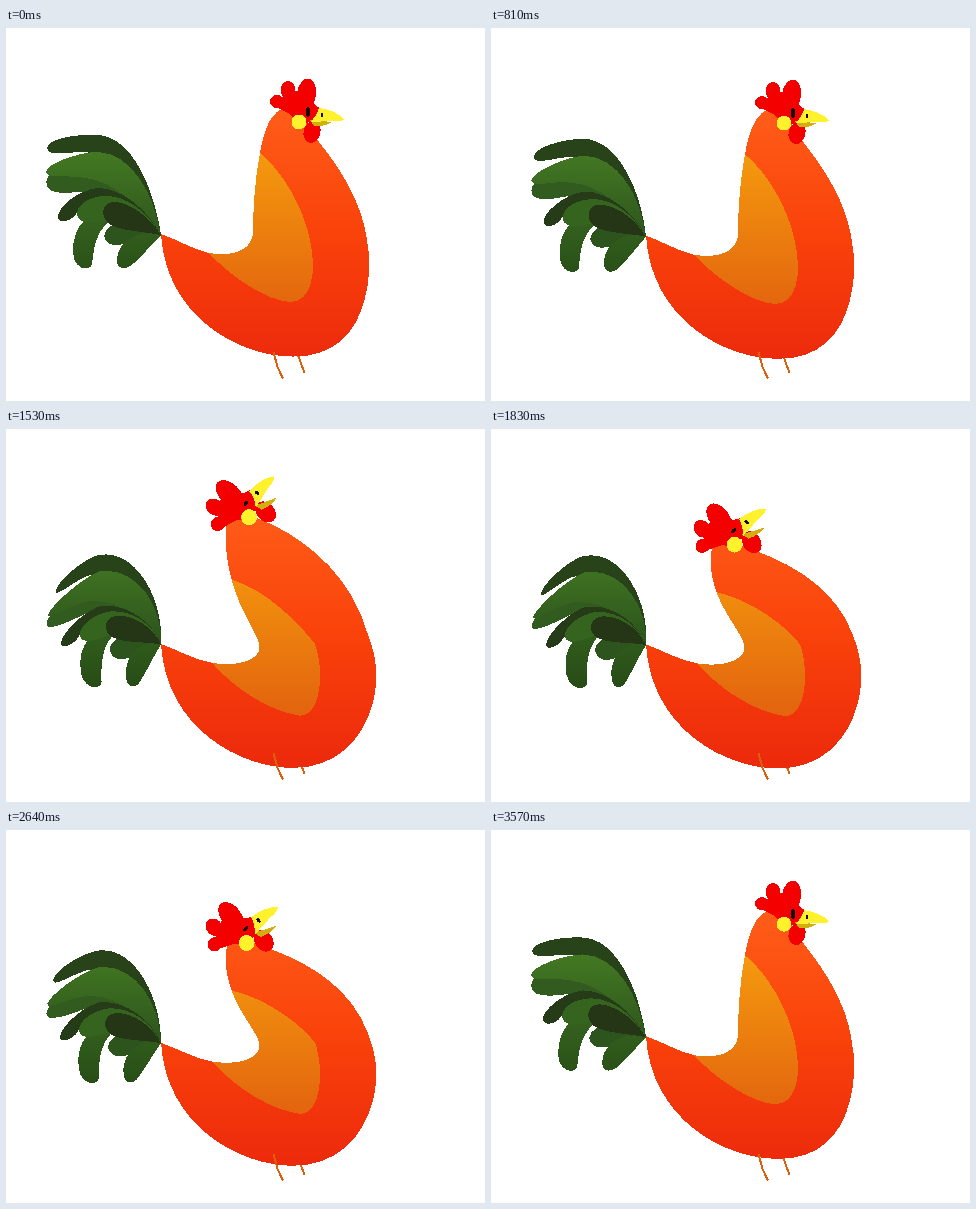
Recreate the animation shown at these times as an HTML page. Size 479x373 px, loop 3600 ms.

```html
<!DOCTYPE html>
<html lang="en">
<head>
<meta charset="utf-8">
<title>Crowing rooster</title>
<style>
  html, body { margin: 0; width: 100%; height: 100%; overflow: hidden; background: #fff; }
  svg { display: block; width: 479px; height: 373px; }
</style>
</head>
<body>
<svg viewBox="0 0 479 373" shape-rendering="crispEdges">
  <defs>
    <linearGradient id="coat" gradientUnits="userSpaceOnUse" x1="0" y1="85" x2="0" y2="335">
      <stop offset="0" stop-color="#ff5c18"/>
      <stop offset=".5" stop-color="#f9410a"/>
      <stop offset="1" stop-color="#ec2a0c"/>
    </linearGradient>
    <linearGradient id="gold" gradientUnits="userSpaceOnUse" x1="0" y1="130" x2="0" y2="280">
      <stop offset="0" stop-color="#f4980e"/>
      <stop offset="1" stop-color="#e3650e"/>
    </linearGradient>
    <linearGradient id="leaf" gradientUnits="userSpaceOnUse" x1="0" y1="125" x2="0" y2="210">
      <stop offset="0" stop-color="#437822"/>
      <stop offset="1" stop-color="#2d551d"/>
    </linearGradient>
    <linearGradient id="stem" gradientUnits="userSpaceOnUse" x1="0" y1="190" x2="0" y2="258">
      <stop offset="0" stop-color="#35621f"/>
      <stop offset="1" stop-color="#274c16"/>
    </linearGradient>
  </defs>
  <g id="tail"></g>
  <path d="M292 327L298.500 345" stroke="#dc600c" stroke-width="2"/>
  <path id="body" fill="url(#coat)"/>
  <path id="patch" fill="url(#gold)"/>
  <path d="M267.500 324L271.500 339L277 350.500" fill="none" stroke="#dc600c" stroke-width="2"/>
  <g id="head">
    <g fill="#f40000">
      <ellipse cx="271" cy="73.500" rx="7" ry="6.500"/>
      <ellipse cx="282" cy="62" rx="7.500" ry="9"/>
      <ellipse cx="300.500" cy="66" rx="9.500" ry="15.500" transform="rotate(8 300.500 66)"/>
      <path d="M270 79L280 64L298 62L309 77L314 80L311 92L294 97L284 86Z"/>
      <ellipse cx="306" cy="104" rx="8.500" ry="11" transform="rotate(12 306 104)"/>
    </g>
    <path id="jaw" fill="#d4ae0c" d="M304 92L326 94Q318 99 308 98Z"/>
    <path fill="#fff22c" d="M313 80Q329 82 338 91Q337 94 325 93L304 94Q311 88 313 80Z"/>
    <ellipse cx="316" cy="87" rx="1.500" ry="2.500" fill="#111"/>
    <ellipse id="eye" cx="302" cy="84" fill="#160000"/>
    <circle cx="293" cy="94" r="7.500" fill="#fff22c"/>
  </g>
</svg>
<script>
const LOOP = 3600, BOB = 450;
const $ = id => document.getElementById(id);

const feathers = [
  ['#28431a', 'M155,207 C148,160 125,105 88,107 C70,106 41,111 41,120 C42,129 60,124 78,124 C110,123 135,165 155,207'],
  ['#315b1f', 'M155,207 C130,140 70,128 46,145 C38,150 39,160 46,163 C62,168 75,162 90,163 C115,165 135,185 155,207'],
  ['url(#leaf)', 'M155,207 C148,165 125,125 92,124 C72,124 40,136 40,144 C42,152 60,146 80,150 C110,154 135,180 155,207'],
  ['url(#stem)', 'M108,182 C85,182 66,195 67,225 C68,242 84,244 86,236 C88,215 92,200 108,190 Z'],
  ['#263c18', 'M155,207 C140,180 115,160 92,160 C72,162 50,180 52,190 C54,196 66,193 70,186 C80,172 110,168 155,207'],
  ['#35641f', 'M155,207 C140,182 120,168 100,168 C82,168 70,178 71,187 C74,198 90,194 104,192 C125,190 145,200 155,207'],
  ['#2e541d', 'M155,207 C135,192 100,190 98,208 C100,220 115,218 125,214 C138,212 148,209 155,207'],
  ['url(#stem)', 'M155,207 C132,200 110,214 111,234 C112,243 122,241 128,235 C138,226 148,214 155,207'],
  ['#253616', 'M155,207 C140,184 120,174 108,174 C96,174 94,188 102,195 C112,203 135,203 155,207']
].map(([fill, shape]) => {
  const el = document.createElementNS('http://www.w3.org/2000/svg', 'path');
  el.setAttribute('fill', fill);
  $('tail').append(el);
  return { el, shape };
});

// Each outline: upright pose, leaning pose
const neckline = [
  'C228,229 245,222 247,206 C247,180 249,150 254,125',
  'C232,230 256,222 253.5,208 C250,195 234,179 225.5,156'
];
const bodyPoses = [
  'M155,206 C172,212 186,221 203,225 ' + neckline[0] +
  ' C258,100 266,82 280,80 C296,80 306,104 313,114 C334,140 354,172 360,206' +
  ' C365,232 364,250 359,270 C350,308 325,329 287,328.5 C235,329 160,290 155,206Z',
  'M155,207 C172,213 190,223 206,225.4 ' + neckline[1] +
  ' C219,138 217,116 224,108 C236,102 256,113 268,117 C306,131 346,155 362,198' +
  ' C372,223 372,242 367,264 C357,301 330,328 287,328 C235,328 160,290 155,207Z'
];
const patchPoses = [
  'M203,225 ' + neckline[0] + ' C276,143 297,178 304,212 C311,244 306,274 284,274 C262,273 226,250 203,225Z',
  'M206,225.4 ' + neckline[1] + ' C262,164 296,190 309,207 C318,231 316,277 294,277 C266,273 232,254 206,225.4Z'
];

const clamp = v => Math.max(0, Math.min(1, v));
const mix = (a, b, k) => a + (b - a) * k;
const ease = (t, a, b) => { const k = clamp((t - a) / (b - a)); return k * k * (3 - 2 * k); };
const warp = (shape, move) => shape.replace(/([\d.]+),([\d.]+)/g, (_, x, y) =>
  move(+x, +y).map(v => v.toFixed(2)).join(','));

function blend([a, b], k) {
  const nums = b.match(/[\d.]+/g);
  let i = 0;
  return a.replace(/[\d.]+/g, v => mix(+v, +nums[i++], k).toFixed(2));
}

// Feathers droop more toward their tips; their roots bulge toward the body
function bendTail(x, y, s) {
  const u = (155 - x) / 115;
  const low = Math.max(0, y - 165) * .0125 * Math.min(1, 3 * u);
  const high = Math.max(0, 150 - y) * .028 * u ** 4;
  const root = Math.max(0, 207 - y) * .026 * Math.max(0, 1 - 3.5 * u);
  const droop = (3.1 - 1.2 * clamp((y - 150) / 45)) * u * u;
  const hang = .04 * Math.max(0, y - 210) * (1 - 1.5 * u);
  return [x + s * (low + high + root), y + s * (.8 + droop + hang)];
}

function draw(t) {
  const lean = ease(t, 900, 1480) - ease(t, 2640, 3000);
  const sink = ease(t, 1050, 1650) - ease(t, 2400, 3000);
  const bob = (1 - Math.cos(t / BOB * 2 * Math.PI)) / 2;
  const s = 11.3 * sink + 6.5 * bob * (1 - sink);
  // Three crows, one per bob, while leaning back
  const crow = t > 3 * BOB && t < 6 * BOB ? bob * bob : 0;

  for (const f of feathers) f.el.setAttribute('d', warp(f.shape, (x, y) => bendTail(x, y, s)));

  const squash = (x, y) => [
    x,
    y + s * (.5 + (y - 94) * .0022) - 33 * crow * clamp((190 - y) / 75)
  ];
  $('body').setAttribute('d', warp(blend(bodyPoses, lean), squash));
  $('patch').setAttribute('d', warp(blend(patchPoses, lean), squash));

  const x = 293 + lean * (.8 * s - 58.5);
  const y = 94 + 16 * lean + .5 * s - 33 * crow;
  const turn = -45 * lean - 12 * crow;
  $('head').setAttribute('transform',
    `translate(${x} ${y}) rotate(${turn}) scale(${1 + .06 * lean}) translate(-293 -94)`);
  $('jaw').setAttribute('transform', `rotate(${23 * lean ** 3 + 8 * crow} 304 94)`);
  $('eye').setAttribute('rx', mix(2.5, 3, lean));
  $('eye').setAttribute('ry', mix(5.5, 1.5, lean));
}

const start = performance.now();
function tick() {
  draw((performance.now() - start) % LOOP);
  requestAnimationFrame(tick);
}
tick();
</script>
</body>
</html>
```
